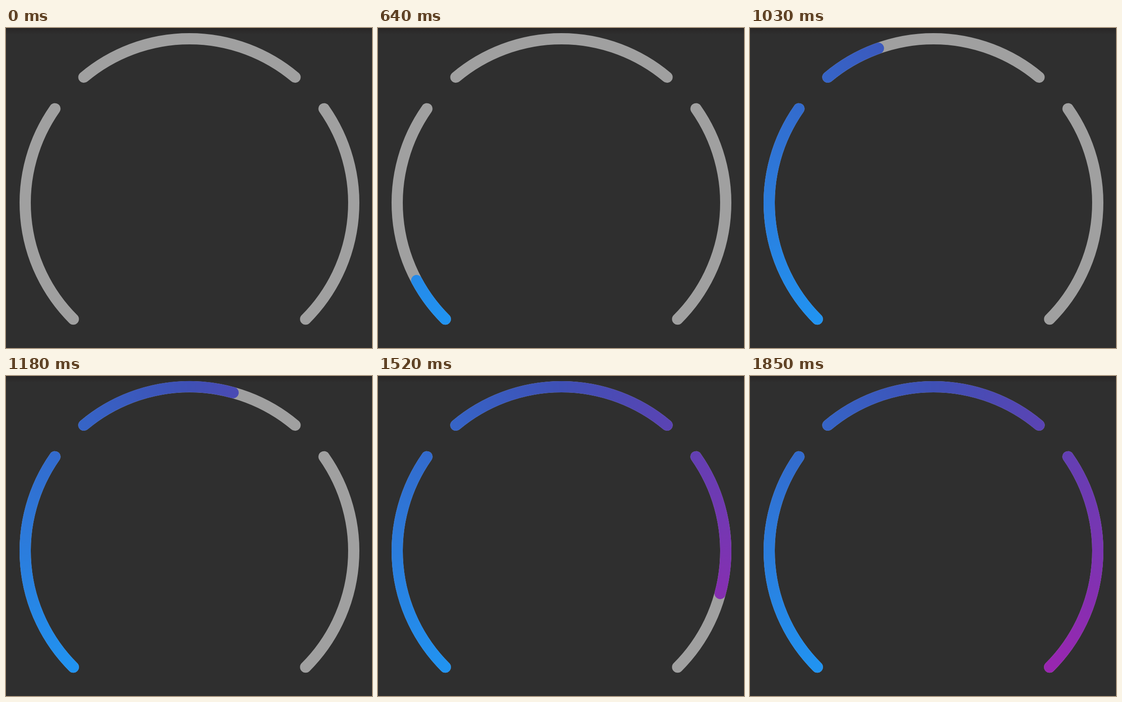
An HTML page with a canvas for the animation above (1.88 s loop, 782 by 684 pixels).

```html
<!DOCTYPE html>
<html lang="en">
<head>
<meta charset="utf-8">
<title>Segmented gauge</title>
<style>
  html, body { margin: 0; width: 100%; height: 100%; overflow: hidden; background: #2f2f2f; }
  canvas { display: block; }
</style>
</head>
<body>
<canvas id="stage" width="782" height="684"></canvas>
<script>
const ctx = document.getElementById('stage').getContext('2d');
const WIDTH = 782, HEIGHT = 684, LOOP = 1880;
const CX = 392, CY = 374, RADIUS = 351, LINE = 24;
const SPAN = 80;
const STARTS = [135, 230, 325];
const rad = degrees => degrees * Math.PI / 180;

// Filled degrees over time: [ms, degrees, degrees per ms]
const KEYS = [
  [330, 0, 0], [640, 16.8, 0.15], [880, 66.7, 0.22], [1180, 135.4, 0.237],
  [1330, 172, 0.225], [1520, 210, 0.16], [1850, 240, 0]
];

// The gradient seam lies in the open bottom of the gauge.
const sweep = ctx.createConicGradient(rad(90), CX, CY);
sweep.addColorStop(45 / 360, '#2193f1');
sweep.addColorStop(180 / 360, '#3f50b5');
sweep.addColorStop(315 / 360, '#9926b0');

const shade = ctx.createLinearGradient(0, 0, 0, 14);
shade.addColorStop(0, '#282626');
shade.addColorStop(1, '#2f2f2f');

function filledAt(time) {
  if (time <= KEYS[0][0]) return 0;
  const next = KEYS.findIndex(key => key[0] > time);
  if (next < 0) return SPAN * STARTS.length;
  const [t0, p0, v0] = KEYS[next - 1];
  const [t1, p1, v1] = KEYS[next];
  const d = t1 - t0, u = (time - t0) / d, w = 1 - u;
  return w * w * ((1 + 2 * u) * p0 + u * d * v0)
       + u * u * ((1 + 2 * w) * p1 - w * d * v1);
}

function arc(start, length, style) {
  ctx.strokeStyle = style;
  ctx.beginPath();
  ctx.arc(CX, CY, RADIUS, rad(start), rad(start + length));
  ctx.stroke();
}

function draw(time) {
  ctx.fillStyle = '#2f2f2f';
  ctx.fillRect(0, 0, WIDTH, HEIGHT);
  ctx.fillStyle = shade;
  ctx.fillRect(0, 0, WIDTH, 14);

  ctx.lineWidth = LINE;
  ctx.lineCap = 'round';
  const filled = filledAt(time);
  STARTS.forEach((start, i) => {
    arc(start, SPAN, '#a0a0a0');
    const length = Math.min(SPAN, filled - i * SPAN);
    if (length > 0) arc(start, length, sweep);
  });
}

let origin;
function tick(now) {
  origin ??= now;
  draw((now - origin) % LOOP);
  requestAnimationFrame(tick);
}
draw(0);
requestAnimationFrame(tick);
</script>
</body>
</html>
```
